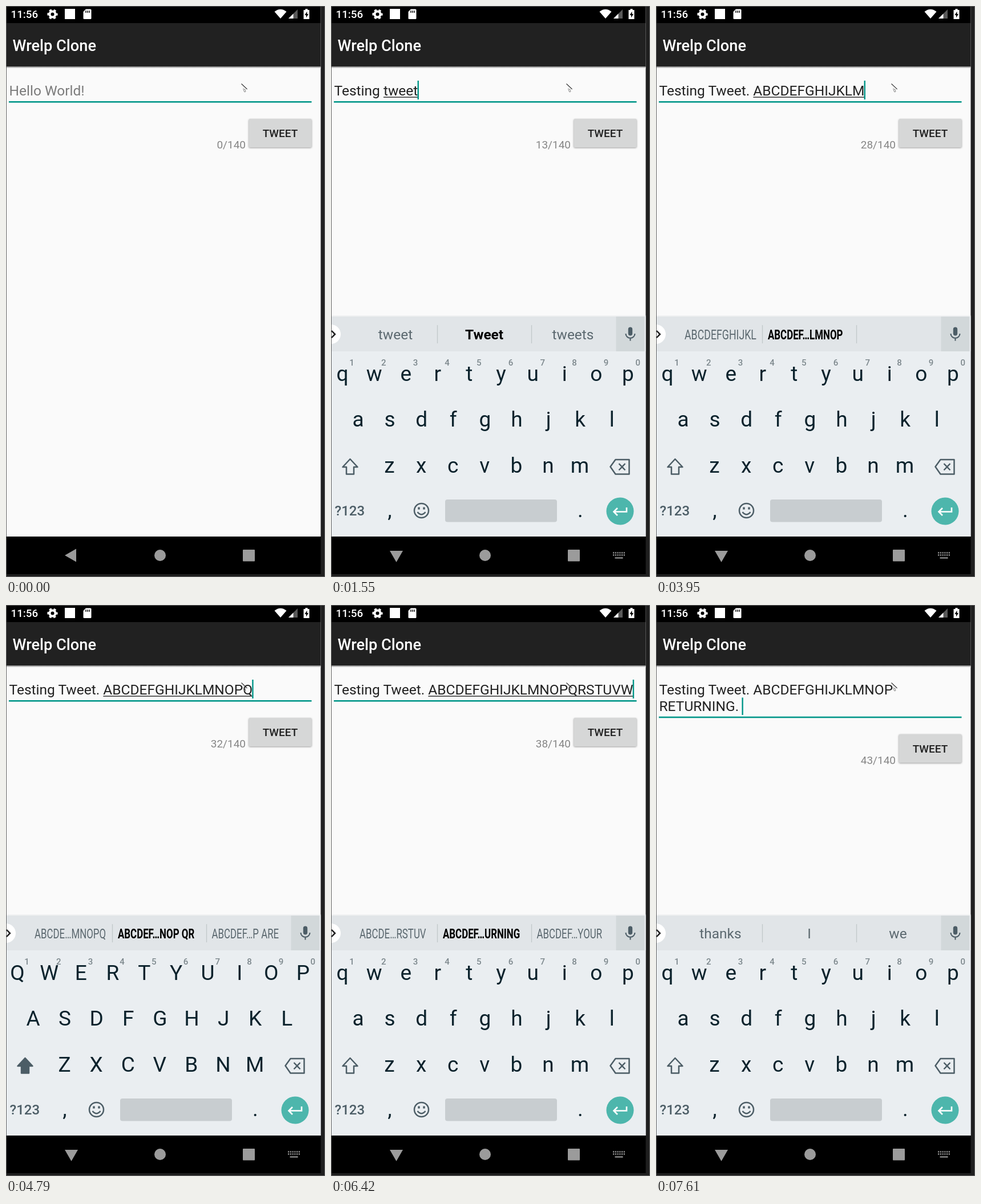
Recreate the animation shown at these times as an HTML page. Size 559 px wide and 1002 px high, loop 8000 ms.

```html
<!DOCTYPE html>
<html lang="en">
<head>
<meta charset="utf-8">
<title>Text field demo</title>
<style>
  html, body { margin: 0; width: 559px; height: 1002px; overflow: hidden; background: #1f1f1f; }
  svg { display: block; font-family: Roboto, sans-serif; }
  text { white-space: pre; }
  .input { font-size: 24.5px; fill: #222; }
  .hint { fill: #7b7b7b; }
  .sug { font-size: 24.45px; fill: #5b686f; }
  .sug.main { font-weight: 700; fill: #000; }
  .sug.plain { font-weight: 400; fill: #5b686f; }
  .key { font-size: 37px; fill: #0b222c; text-anchor: middle; }
  .digit { font-size: 15px; font-weight: 500; fill: #7c878c; text-anchor: middle; }
  .icon { fill: none; stroke: #4c5d66; stroke-width: 2.5; }
  .caps .key { text-transform: uppercase; }
  .caps #shift { fill: #4c5d66; }
  .btn { filter: drop-shadow(0 1px 1.5px rgba(0, 0, 0, .38)); }
</style>
</head>
<body>
<svg width="559" height="1002" viewBox="0 0 559 1002">
  <defs>
    <linearGradient id="shade" x2="0" y2="1">
      <stop stop-color="#8f8f8f"/><stop offset="1" stop-color="#fafafa"/>
    </linearGradient>
    <clipPath id="screen"><path d="M1 0h550.5v997H1z"/></clipPath>
  </defs>
  <g clip-path="url(#screen)">
    <rect x="1" width="551" height="931" fill="#fafafa"/>
    <rect x="1" width="551" height="30"/>
    <rect x="1" y="30" width="551" height="76.5" fill="#212121"/>
    <rect x="1" y="106.5" width="551" height="3" fill="url(#shade)"/>

    <!-- status bar -->
    <g fill="#fff">
      <text x="8.5" y="21" font-size="18.8" font-weight="500">11:56</text>
      <g fill="none" stroke="#fff">
        <circle cx="81.5" cy="14.5" r="5" stroke-width="4"/>
        <circle cx="81.5" cy="14.5" r="7.6" stroke-width="3" stroke-dasharray="4.2 3.76" stroke-dashoffset="2.1"/>
      </g>
      <rect x="103" y="5" width="18" height="18"/>
      <path d="M140 5.5h8a1.5 1.5 0 0 1 1.5 1.5v14.5a1.5 1.5 0 0 1-1.5 1.5h-11a1.5 1.5 0 0 1-1.5-1.5V10z"/>
      <path d="M470.5 10Q481 1.5 491.5 10L481 22z"/>
      <path d="M511 6v16h-16z" opacity=".35"/>
      <path d="M503.5 13.5V22h-8.5z"/>
      <path d="M524.5 5h4v2h3v16h-10V7h3z"/>
    </g>
    <path d="M140 8v4M143 8v4M146 8v4" stroke="#000" stroke-width="1.4"/>
    <path d="M527.5 9.5l-4 6.500h2.500v4.500l4-6.500h-2.500z"/>
    <text x="11.5" y="79" font-size="27.2" font-weight="500" fill="#fff">Wrelp Clone</text>

    <!-- form -->
    <text class="input" id="line1" x="5.5" y="157"></text>
    <text class="input" id="line2" x="5.5" y="186"></text>
    <rect id="mark" height="1.4" fill="#222"/>
    <rect id="caret" width="2.4" fill="#009688"/>
    <g id="below">
      <rect x="5" y="167" width="530.5" height="2.6" fill="#009688"/>
      <text id="count" x="420" y="250" font-size="19" fill="#868686" text-anchor="end"></text>
      <rect class="btn" x="425.5" y="198" width="110" height="50" rx="2" fill="#d6d7d7"/>
      <text x="480.5" y="230" font-size="19" font-weight="500" fill="#1f1f1f" text-anchor="middle">TWEET</text>
    </g>
    <path d="M412.5 136.5l10 9.5" stroke="#333" stroke-width="1.1"/>
    <path d="M415 145.5l4.5 1M416 147l2 4 2-1-1.5-3.5" fill="none" stroke="#777" stroke-width=".9"/>

    <!-- navigation bar -->
    <rect x="1" y="931" width="551" height="66"/>
    <g fill="#9b9b9b">
      <path id="back"/>
      <circle cx="270" cy="964" r="10"/>
      <rect x="415" y="954" width="21" height="20.5" rx="1"/>
    </g>

    <g id="board">
      <rect x="1" y="543" width="551" height="2" fill="#eff0f1"/>
      <rect x="1" y="545" width="551" height="386" fill="#eaeef1"/>
      <rect x="1" y="545" width="551" height="61" fill="#e1e5e8"/>
      <rect x="499.5" y="545" width="49.5" height="61" fill="#d2d8da"/>
      <circle cx="0" cy="576" r="17" fill="#fff"/>
      <path d="M1 570l6 6-6 6" class="icon" style="stroke:#222"/>
      <path d="M186.5 560v32M351.5 560v32" stroke="#c1c7ca" stroke-width="1.3"/>
      <g id="sugs"></g>
      <rect x="520.8" y="563.5" width="7.4" height="15" rx="3.7" fill="#4c5d66"/>
      <path class="icon" d="M516.5 575a8 7.7 0 0 0 16 0M524.5 582.5v5" style="stroke-width:2.1"/>
      <g id="keys"></g>
      <path id="shift" class="icon" d="M33.5 795l-13 14h6.500v12.500h13V809h6.500z" stroke-linejoin="round"/>
      <path class="icon" d="M489.5 808.5l9-12.500h24v25.500h-24zM504.5 803l11 11.500M515.5 803l-11 11.500" stroke-linejoin="round"/>
      <text x="6.5" y="894" font-size="24" font-weight="500" fill="#4c5d66">?123</text>
      <circle class="icon" cx="158.5" cy="885.5" r="12.5"/>
      <path class="icon" d="M151.5 888q7 8.500 14 0"/>
      <path d="M154 879.5v4M163 879.5v4" stroke="#4c5d66" stroke-width="3.4"/>
      <rect x="200" y="866" width="196" height="39.5" rx="4" fill="#c8cdd0"/>
      <circle cx="506.5" cy="886.5" r="24" fill="#4db6ac"/>
      <path d="M518 880v7.500h-22M502 881l-6.500 6.500 6.500 6.500" fill="none" stroke="#fff" stroke-width="2.6"/>
      <path d="M494 959.5h21M494 963.5h21" stroke="#8d8d8d" stroke-width="2.3" stroke-dasharray="2.3 1.44"/>
      <path d="M497.5 968.5h14" stroke="#8d8d8d" stroke-width="2.3"/>
    </g>
  </g>
  <rect x=".5" y=".5" width="558" height="1001" fill="none" stroke="#636363"/>
</svg>
<script>
const $ = id => document.getElementById(id);
const LOOP = 8000, LEFT = 5.5, WRAP = 536, LINE = 28.7;
const ABC = 'ABCDEFGHIJKLMNOPQRSTUVWXYZ';
const HEAD = 'Testing Tweet. ';
const FINAL = HEAD + ABC.slice(0, 16) + ' RETURNING. ';

// [time, characters typed, characters known to the suggestions]
const steps = [
  [0, 0], [300, 1], [440, 2], [580, 4], [720, 5], [850, 7], [990, 8], [1130, 10], [1270, 12],
  [1550, 13], [1670, 14], [1805, 15], [1940, 16], [2080, 17], [2210, 18],
  [2490, 19], [2610, 20], [2730, 21], [2850, 22], [3000, 23], [3120, 24], [3240, 25],
  [3520, 26], [3650, 27], [3950, 28], [4080, 29], [4230, 30], [4370, 31],
  [4670, 32], [4790, 32, 32], [5190, 33, 32], [5330, 34, 32], [5470, 34, 33], [5610, 35, 33],
  [5760, 35, 34], [5880, 36, 34], [6000, 36, 35], [6120, 37, 35], [6270, 37, 36], [6420, 38, 37],
  [6700, 39, 38], [6840, 40, 39], [6970, 41, 41], [7220, 42, 41], [7350, 43, 41], [7610, 43, 43]
];

function set(el, attrs) {
  for (const k in attrs) el.setAttribute(k, attrs[k]);
}
function add(parent, cls, x, y, label = '') {
  const el = document.createElementNS('http://www.w3.org/2000/svg', 'text');
  el.textContent = label;
  set(el, { class: cls, x, y });
  return $(parent).appendChild(el);
}

[['qwertyuiop', 20, 658], ['asdfghjkl', 47.5, 738], ['zxcvbnm', 102.5, 819]].forEach(([row, x, y]) =>
  [...row].forEach((c, i) => add('keys', 'key', x + i * 55.6, y, c)));
for (let i = 0; i < 10; i++) add('keys', 'digit', 36.5 + i * 55.7, 631, (i + 1) % 10);
add('keys', 'key', 103, 897, ',');
add('keys', 'key', 437, 897, '.');

const ROOM = 126;
const slots = [[50, 113], [196, 268.5], [360.5, 424]].map(([left, mid], i) =>
  ({ left, mid, el: add('sugs', i === 1 ? 'sug main' : 'sug', 0, 0) }));

// Long words are condensed to fit, shortened ones to a fixed limit
function suggest({ left, mid, el }, word) {
  el.textContent = word;
  const w = el.getComputedTextLength();
  const k = word.includes('…') ? .69 : Math.min(1, ROOM / w);
  const x = k < 1 ? left : mid - w / 2;
  set(el, { transform: `translate(${x} 585) scale(${k} 1)` });
}

function typed(n) {
  if (n < 14) return 'Testing tweet'.slice(0, n);
  return (n < 42 ? HEAD + ABC : FINAL).slice(0, n);
}

function words(n) {
  if (n < 9) return ['Test', 'Testing', 'Tested'];
  if (n < 14) return ['tweet', 'Tweet', 'tweets'];
  if (n < 16 || n > 42) return ['thanks', 'I', 'we'];
  const w = ABC.slice(0, n - 15);
  const short = w.length > 12 ? w.slice(0, 5) + '…' + w.slice(-5) : w;
  if (n < 32) return [short, 'ABCDEF…LMNOP', ''];
  return n < 37 ? [short, 'ABCDEF…NOP QR', 'ABCDEF…P ARE'] : [short, 'ABCDEF…URNING', 'ABCDEF…YOUR'];
}

function show([time, n, known = n - 1]) {
  const text = typed(n), one = $('line1'), two = $('line2');
  one.textContent = text || 'Hello World!';
  one.classList.toggle('hint', !n);
  two.textContent = '';
  let last = one;
  if (LEFT + one.getComputedTextLength() > WRAP) {
    const cut = text.trimEnd().lastIndexOf(' ') + 1;
    one.textContent = text.slice(0, cut);
    two.textContent = text.slice(cut);
    last = two;
  }
  const wrapped = last === two, drop = wrapped ? LINE : 0;
  const end = LEFT + last.getComputedTextLength();
  const word = /[a-z]+$/i.exec(last.textContent);
  const from = word && word.index ? LEFT + last.getSubStringLength(0, word.index) : LEFT;
  set($('mark'), { x: from, y: 159.3 + drop, width: n && word ? end - from : 0 });
  set($('caret'), { x: end - .8, y: wrapped ? 162.5 : 131, height: n ? (wrapped ? 30.5 : 33) : 0 });
  set($('below'), { transform: `translate(0 ${drop})` });
  $('count').textContent = n + '/140';

  $('board').style.display = n ? '' : 'none';
  $('board').classList.toggle('caps', time === 4790);
  set($('back'), { d: n ? 'M103 956h23l-11.5 20z' : 'M123 952.5v23l-20-11.5z' });
  if (!n) return;
  const list = words(known);
  slots[1].el.classList.toggle('plain', list[1] === 'I');
  slots.forEach((slot, i) => suggest(slot, list[i]));
}

let current;
function tick(now) {
  const t = now % LOOP;
  const step = steps.findLast(s => s[0] <= t);
  if (step !== current) show(current = step);
  requestAnimationFrame(tick);
}
tick(performance.now());
</script>
</body>
</html>
```
